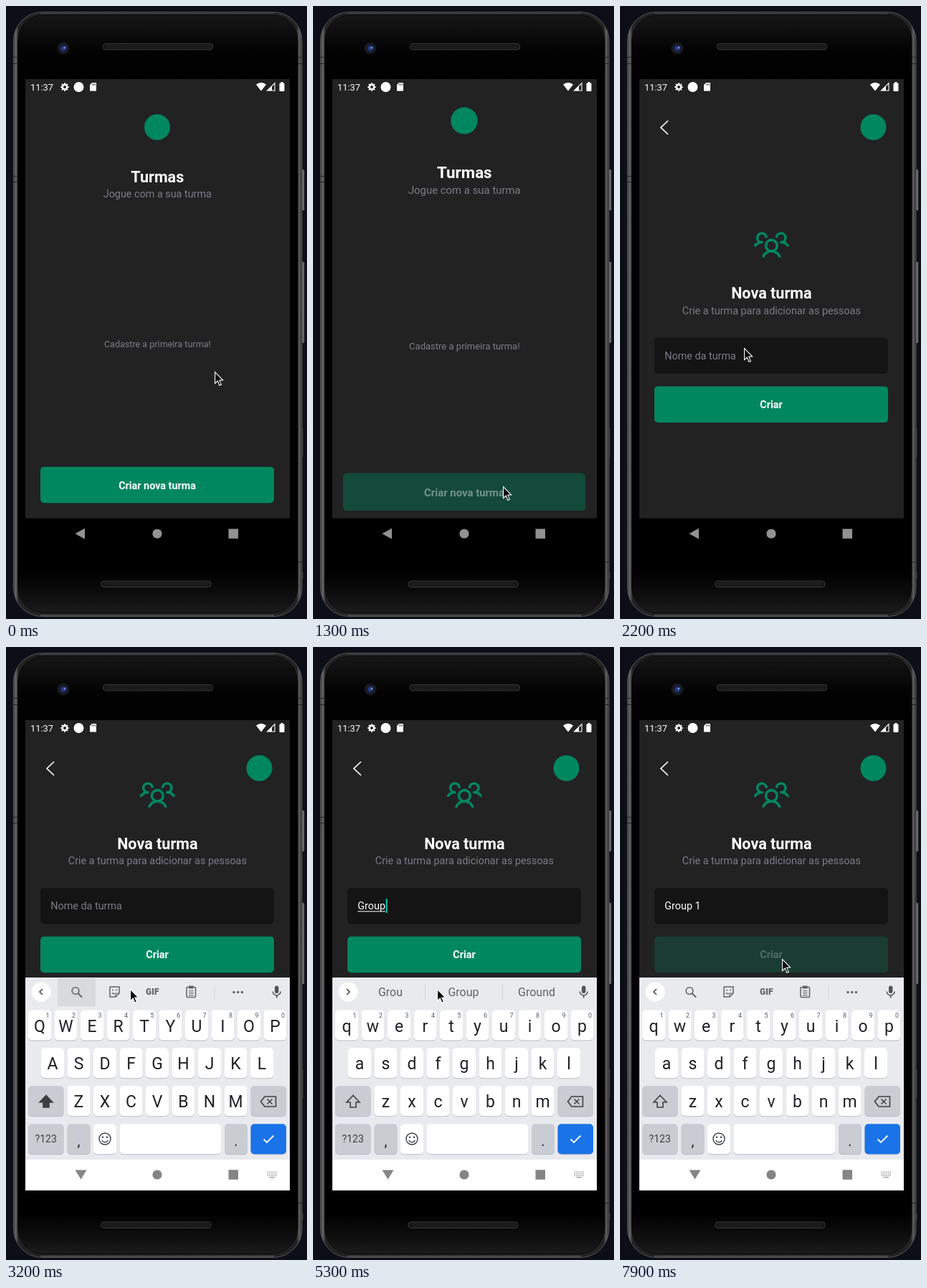
An HTML page with a canvas for the animation above (8 s loop, 420x855 px).

```html
<!DOCTYPE html>
<html lang="pt-BR">
<head>
<meta charset="utf-8">
<title>Turmas</title>
<style>
html, body { margin: 0; width: 100%; height: 100%; overflow: hidden; background: #0c0f17; }
canvas { display: block; width: 420px; height: 855px; }
</style>
</head>
<body>
<canvas id="stage"></canvas>
<script>
const LOOP = 8000, STEP = 100;
const GREEN = '#00875f', BG = '#222222', GREY = '#7c7c8a', INK = '#5f6368';
const canvas = document.getElementById('stage');
const ratio = window.devicePixelRatio || 1;
canvas.width = 420 * ratio;
canvas.height = 855 * ratio;
const c = canvas.getContext('2d');

// [time, x, y]
const pointerPath = [
  [0, 291, 510], [100, 291, 510], [600, 268, 669], [700, 268, 669], [1000, 265, 670],
  [1600, 265, 670], [1800, 236, 555], [2000, 183, 438], [2200, 173, 477],
  [7200, 173, 477], [7300, 175, 479], [7700, 226, 435], [LOOP, 226, 435]
];
// [time, typed text, underlined letters]
const typing = [
  [0, '', 0], [4000, 'G', 0], [4200, 'G', 1], [4500, 'Gr', 1], [4800, 'Gro', 2],
  [5100, 'Grou', 3], [5300, 'Group', 5], [5700, 'Group ', 5], [5800, 'Group ', 0], [6000, 'Group 1', 0]
];
const suggestions = [
  [0, ''], [4300, 'G,Good,Go'], [4800, 'Gr,Great,Gra'], [5100, 'Gro,Group,Ground'],
  [5300, 'Grou,Group,Ground'], [5600, 'Group,Groups,Grouped'], [6100, '1,1st,1000'], [6300, '']
];
const press = [
  [0, 1], [800, .75], [900, .42], [1000, .2], [1300, .4], [1400, 1], [7800, .65], [7900, .25]
];

const at = (list, t) => list.filter(e => e[0] <= t).pop();

function pointerAt(t) {
  const i = Math.max(1, pointerPath.findIndex(p => p[0] >= t));
  const [t0, x0, y0] = pointerPath[i - 1], [t1, x1, y1] = pointerPath[i];
  const k = (t - t0) / (t1 - t0);
  return [Math.round(x0 + (x1 - x0) * k), Math.round(y0 + (y1 - y0) * k)];
}

function text(s, x, y, size, color, weight = 400, align = 'center') {
  c.font = `${weight} ${size}px Roboto, sans-serif`;
  c.fillStyle = color;
  c.textAlign = align;
  c.fillText(s, x, y);
}
function rect(x, y, w, h, color) {
  c.fillStyle = color;
  c.fillRect(x, y, w, h);
}
function round(x, y, w, h, r, fill, stroke) {
  c.beginPath();
  c.roundRect(x, y, w, h, r);
  paint(fill, stroke);
}
function disc(x, y, r, fill, stroke) {
  c.beginPath();
  c.arc(x, y, r, 0, Math.PI * 2);
  paint(fill, stroke);
}
function poly(points, fill, stroke, close = true) {
  c.beginPath();
  for (let i = 0; i < points.length; i += 2) c.lineTo(points[i], points[i + 1]);
  if (close) c.closePath();
  paint(fill, stroke);
}
function line(points, color, width) {
  c.lineWidth = width;
  poly(points, null, color, false);
}
function paint(fill, stroke) {
  if (fill) { c.fillStyle = fill; c.fill(); }
  if (stroke) { c.strokeStyle = stroke; c.stroke(); }
}
function gradient(x0, y0, x1, y1, ...stops) {
  const g = c.createLinearGradient(x0, y0, x1, y1);
  stops.forEach(([k, color]) => g.addColorStop(k, color));
  return g;
}
function placed(draw, scale, x, y) {
  c.save();
  c.translate(x, y);
  c.scale(scale, scale);
  c.translate(-x, -y);
  draw();
  c.restore();
}

function speaker(x, y) {
  c.lineWidth = 1;
  round(x, y, 153, 8.5, 3.5, '#171717', '#393939');
  for (let i = 0; i < 48; i++) {
    rect(x + 5 + i * 3, y + 2.5, 1.2, 1.2, '#303030');
    rect(x + 6.5 + i * 3, y + 5, 1.2, 1.2, '#303030');
  }
}

function phone() {
  rect(0, 0, 420, 855, '#0c0f17');
  const button = (y, h) => round(411, y, 5.5, h, 1.5, gradient(411, 0, 417, 0, [0, '#222'], [.6, '#777'], [1, '#333']));
  button(228, 57);
  button(357, 113);
  rect(413, 589, 1.5, 40, '#333');
  rect(413, 790, 1.5, 9, '#333');

  c.lineWidth = 1;
  round(10.5, 8.5, 402.5, 843, 40,
    gradient(10, 0, 413, 0, [0, '#262626'], [.009, '#686868'], [.018, '#222'], [.982, '#222'], [.991, '#606060'], [1, '#262626']),
    '#585858');
  for (const y of [71, 80, 237, 245]) rect(10, y, 7, 1, '#222');
  for (const y of [71, 80, 775]) rect(407, y, 6, 1, '#222');
  c.lineWidth = 1;
  round(16.5, 12.5, 390.5, 834, 36,
    gradient(0, 12, 0, 847, [0, '#171717'], [.06, '#030303'], [.12, '#000'], [.93, '#000'], [.97, '#0e0e0e'], [1, '#1c1c1c']),
    '#0a0a0a');
  rect(48, 10, 326, 1, '#4c4c4c');
  rect(48, 849, 326, 1.5, '#555');

  round(198, 26, 26, 9, 4, '#101010');
  disc(80, 59, 8.5, '#19191d');
  disc(80, 59, 5.5, '#182142');
  disc(80, 59, 3.2, '#293b78');
  disc(82, 58, 1.5, '#718be0');
  speaker(135.5, 52.5);
  speaker(133, 802);
}

function statusBar() {
  const W = '#fff';
  text('11:37', 34, 117.5, 12.8, W, 400, 'left');
  c.lineWidth = 2.4;
  disc(82, 113, 3.2, null, W);
  for (let i = 0; i < 8; i++) {
    const a = i * Math.PI / 4, x = Math.cos(a), y = Math.sin(a);
    line([82 + x * 3.8, 113 + y * 3.8, 82 + x * 5.7, 113 + y * 5.7], W, 2);
  }
  disc(101.5, 113, 7, W);
  poly([120, 107, 126, 107, 126, 118.5, 117, 118.5, 117, 110], W);
  for (const x of [120, 122, 124]) rect(x, 108.5, 1, 2, BG);
  c.beginPath();
  c.moveTo(356, 118.5);
  c.lineTo(349, 109.5);
  c.quadraticCurveTo(356, 103.8, 363, 109.5);
  c.closePath();
  paint(W);
  c.lineWidth = 1.1;
  poly([375, 107.5, 375, 118, 364.5, 118], null, W);
  poly([371, 111.5, 371, 118, 364.5, 118], W);
  round(381.5, 107.5, 7, 11.5, 1, W);
  rect(383.5, 106, 3, 2, W);
}

function actionButton(label, y, textY, alpha) {
  c.globalAlpha = alpha;
  round(48, y, 326, 50.5, 5, GREEN);
  text(label, 211, textY, 14.36, '#fff', 700);
  c.globalAlpha = 1;
}

const badge = x => disc(x, 169, 18, GREEN);

function listScreen(alpha) {
  badge(211);
  text('Turmas', 211.3, 245.7, 21.55, '#fff', 700);
  text('Jogue com a sua turma', 211.3, 267, 14.36, GREY);
  text('Cadastre a primeira turma!', 211.3, 476, 12.57, GREY);
  actionButton('Criar nova turma', 642.7, 673.5, alpha);
}

const people = new Path2D('M168 140a40 40 0 1 1-80 0a40 40 0 1 1 80 0' +
  'M196 116a59.8 59.8 0 0 1 48 24M12 140a59.8 59.8 0 0 1 48-24M70.4 216a64.1 64.1 0 0 1 115.2 0' +
  'M60 116A32 32 0 1 1 91.4 78M164.6 78A32 32 0 1 1 196 116');

function formScreen(t, alpha) {
  line([67, 160, 57, 169.5, 67, 179], '#fff', 1.7);
  badge(353.5);
  c.save();
  if (t >= 3200) c.translate(0, -126.7);
  c.save();
  c.translate(186.2, 306.7);
  c.scale(.1964, .1964);
  c.lineWidth = 18;
  c.lineCap = c.lineJoin = 'round';
  c.strokeStyle = GREEN;
  c.stroke(people);
  c.restore();
  text('Nova turma', 211.3, 408.2, 21.55, '#fff', 700);
  text('Crie a turma para adicionar as pessoas', 211.3, 429.7, 14.36, GREY);
  round(48, 462.7, 326, 50.3, 5, '#141414');
  actionButton('Criar', 530.4, 561, alpha);
  field(t);
  c.restore();
}

function field(t) {
  const [, typed, marked] = at(typing, t);
  const left = 62.3, base = 493;
  text(typed || 'Nome da turma', left, base, 14.36, typed ? '#fff' : GREY, 400, 'left');
  if (marked) rect(left, 495, c.measureText(typed.slice(0, marked)).width, 1, '#fff');
  const caretOn = t >= 3500 && t < 6600 || t >= 7300 && t < 7800;
  if (caretOn) rect(left + .8 + c.measureText(typed).width, 477.7, 1.8, 20, '#03dac5');
}

function key(x, y, w, fill = '#fff') {
  round(x, y + 1, w, 42, 5, '#b9bcc2');
  round(x, y, w, 42, 5, fill);
}

function letters(row, first, y, lower) {
  [...row].forEach((ch, i) => {
    const x = first + i * 36.5;
    key(x - 16, y, 32);
    text(lower ? ch.toLowerCase() : ch, x, y + 30, 23, '#202124');
    if (row.length === 10) text((i + 1) % 10, x + 11, y + 10, 9, '#55585c');
  });
}

function toolbar(t) {
  if (t < 4300) rect(72, 462, 53, 39, '#d9dade');
  c.lineWidth = 1.6;
  disc(97, 479.5, 4.8, null, INK);
  line([100.5, 483, 106, 488.5], INK, 2);
  c.lineWidth = 1.5;
  poly([145, 474, 158, 474, 158, 483, 153, 488, 145, 488], null, INK);
  line([158, 483, 153, 483, 153, 488], INK, 1.2);
  disc(149, 478.5, 1, INK);
  disc(154, 478.5, 1, INK);
  line([148, 482, 150, 484, 152, 483], INK, 1.2);
  text('GIF', 204.3, 485.3, 12, INK, 900);
  c.lineWidth = 1.5;
  round(252, 474.5, 12.5, 14, 1, null, INK);
  rect(255, 472.5, 6.5, 4, INK);
  for (const y of [479, 482, 485]) rect(255, y, 6.5, 1.2, INK);
  rect(290.5, 472, 1, 19, '#d5d7db');
  for (const x of [318, 323.7, 329.4]) disc(x, 481.5, 1.7, INK);
}

function strip(t) {
  const words = at(suggestions, t)[1];
  const d = words ? 1 : -1;
  disc(49, 481, 13.5, '#fff');
  line([49 - 2 * d, 477, 49 + 2 * d, 481, 49 - 2 * d, 485], '#444', 1.6);
  if (words) {
    words.split(',').forEach((w, i) => text(w, 108 + i * 102, 487, 16, INK));
    for (const x of [156, 264]) rect(x, 470.5, 1, 21.5, '#cdd0d4');
  } else toolbar(t);
  round(375, 472.5, 5.4, 10.5, 2.7, '#505357');
  c.beginPath();
  c.arc(377.7, 480.5, 5.4, 0, Math.PI);
  c.lineWidth = 1.5;
  paint(null, '#505357');
  line([377.7, 486, 377.7, 489.5], '#505357', 1.6);
}

function keyboard(t) {
  const lower = t >= 4200, special = '#c9ccd2', dark = '#3c4043';
  rect(27, 461, 369, 254, '#e8eaee');
  strip(t);
  letters('QWERTYUIOP', 47, 506.5, lower);
  letters('ASDFGHJKL', 65, 559.3, lower);
  letters('ZXCVBNM', 101.5, 612.2, lower);

  key(31, 612.2, 49.5, special);
  c.lineWidth = 1.6;
  poly([56, 625.5, 65, 635, 60, 635, 60, 642, 52, 642, 52, 635, 47, 635], lower ? null : dark, dark);
  key(341.5, 612.2, 49.5, special);
  poly([355.5, 634, 361, 627, 376.5, 627, 376.5, 641, 361, 641], null, dark);
  line([364.5, 630.5, 371.5, 637.5], dark, 1.5);
  line([371.5, 630.5, 364.5, 637.5], dark, 1.5);

  key(31, 665.2, 49.5, special);
  text('?123', 55.7, 691.3, 14, dark);
  key(85.5, 665.2, 32, special);
  text(',', 101.5, 695.5, 20, '#202124');
  key(122, 665.2, 32);
  c.lineWidth = 1.4;
  disc(138, 686, 8, null, dark);
  disc(135, 683.7, 1.2, dark);
  disc(141, 683.7, 1.2, dark);
  c.beginPath();
  c.arc(138, 686.5, 4.3, .25, Math.PI - .25);
  paint(null, dark);
  key(158.5, 665.2, 141.5);
  key(305, 665.2, 32, special);
  text('.', 320.8, 695.5, 20, '#202124');
  key(341.5, 665.2, 49.5, '#1a73e8');
  line([359.5, 686.5, 364, 691, 373.5, 681.5], '#fff', 1.8);
}

function navBar(open) {
  const gray = open ? '#858585' : '#929292';
  if (open) rect(27, 715, 369, 43, '#fff');
  poly(open ? [96.5, 729.5, 112.5, 729.5, 104.5, 742.5] : [96.5, 736, 110, 728.5, 110, 743.5], gray);
  disc(211, 736, 6.6, gray);
  rect(310.5, 729.3, 13.5, 13.5, gray);
  if (!open) return;
  for (let row = 0; row < 3; row++)
    for (let i = 0; i < 6; i++) rect(364.5 + i * 2.4, 731.5 + row * 2.6, 1.4, 1.4, '#999');
  rect(367.5, 739.2, 7.5, 1.3, '#999');
}

function pointer(t) {
  const [x, y] = pointerAt(t);
  c.save();
  c.translate(x + .6, y + .6);
  c.lineWidth = 1.1;
  poly([0, 0, 0, 15.8, 3.7, 12.4, 6.2, 18.6, 8.8, 17.5, 6.2, 11.5, 11, 11.2], '#080808', '#fff');
  c.restore();
}

function draw(t) {
  c.setTransform(ratio, 0, 0, ratio, 0, 0);
  const open = t >= 3200, alpha = at(press, t)[1];
  phone();
  rect(27, 102, 369, 612.5, BG);
  c.save();
  c.beginPath();
  c.rect(27, 102, 369, open ? 656 : 612.5);
  c.clip();
  if (t < 1400) placed(() => listScreen(alpha), t < 1300 ? 1 : 1.038, 211.5, 408);
  else placed(() => formScreen(t, alpha), t < 1500 ? .975 : 1, 211.5, 408);
  statusBar();
  if (open) keyboard(t);
  c.restore();
  navBar(open);
  pointer(t);
}

function tick() {
  const t = performance.now() % LOOP;
  draw(Math.floor(t / STEP) * STEP);
  requestAnimationFrame(tick);
}
tick();
</script>
</body>
</html>
```
